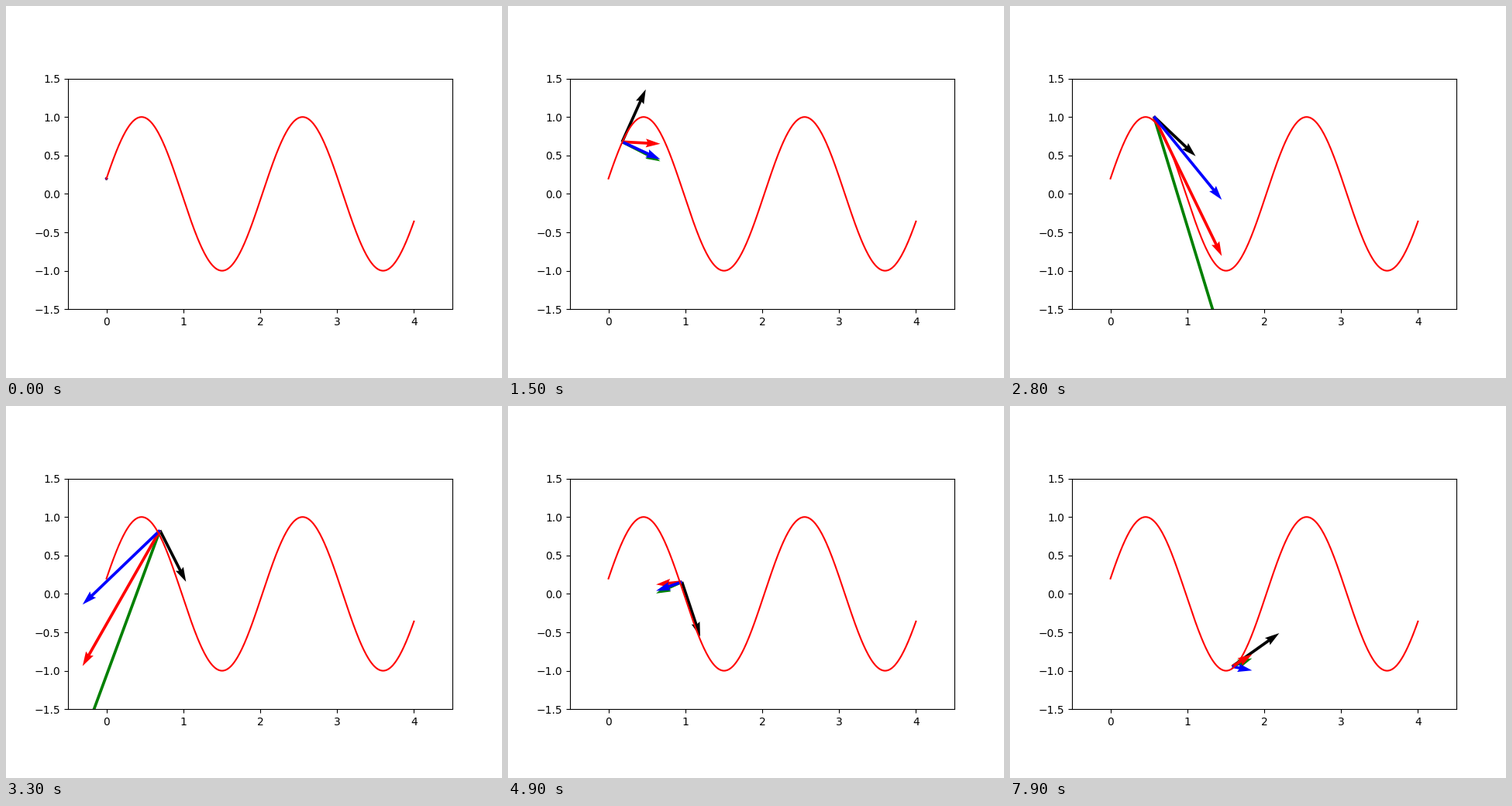
Recreate the animation shown at these times as a matplotlib script. Size 640 by 480 pixels, loop 8 s.

```python
import numpy as np
import matplotlib.pyplot as plt
from matplotlib.animation import FuncAnimation

FRAMES = 80
SPEED = 0.75      # cruising speed along the curve
DT = 0.06         # integration step
GAIN = 0.375      # share of the speed gap closed per step
TURN = 0.37       # scale of the turning acceleration
COLORS = ["black", "green", "red", "blue"]


def curve(x):
    return np.sin(3 * x + 0.2)


def slope(x):
    return 3 * np.cos(3 * x + 0.2)


def tangent(x):
    d = np.array([1.0, slope(x)])
    return d / np.hypot(*d)


def turning(x):
    """Derivative of the unit tangent with respect to x."""
    tx, ty = tangent(x)
    rate = -9 * curve(x) / (1 + slope(x) ** 2)
    return rate * np.array([-ty, tx])


def simulate():
    pos = np.array([0.0, curve(0)])
    states = [(pos, np.zeros((4, 2)))]
    speed = 0.0
    for n in range(1, FRAMES):
        t = tangent(pos[0])
        push = GAIN * (SPEED - speed) / DT
        acc = push * t + TURN * speed / SPEED * turning(0.015 * n + 0.003)
        along = acc.dot(t) * t[1]
        arrows = np.array([speed * t, acc, (acc[0], along), (acc[0], acc[1] - along)])
        states.append((pos, arrows))
        pos = pos + speed * t * DT
        speed += push * DT
    return states


states = simulate()

fig, ax = plt.subplots(figsize=(6.4, 4.8), dpi=100)
ax.set_xlim(-0.5, 4.5)
ax.set_ylim(-1.5, 1.5)
ax.set_aspect("equal")
xs = np.linspace(0, 4, 400)
ax.plot(xs, curve(xs), color="red", lw=1.5)
quivers = [
    ax.quiver([0], [curve(0)], [0], [0], color=c, scale_units="xy", scale=1)
    for c in COLORS
]


def update(n):
    pos, arrows = states[n]
    for q, (u, v) in zip(quivers, arrows):
        q.set_offsets([pos])
        q.set_UVC([u], [v])
    return quivers


anim = FuncAnimation(fig, update, frames=FRAMES, interval=100, repeat=True)
plt.show()
```
